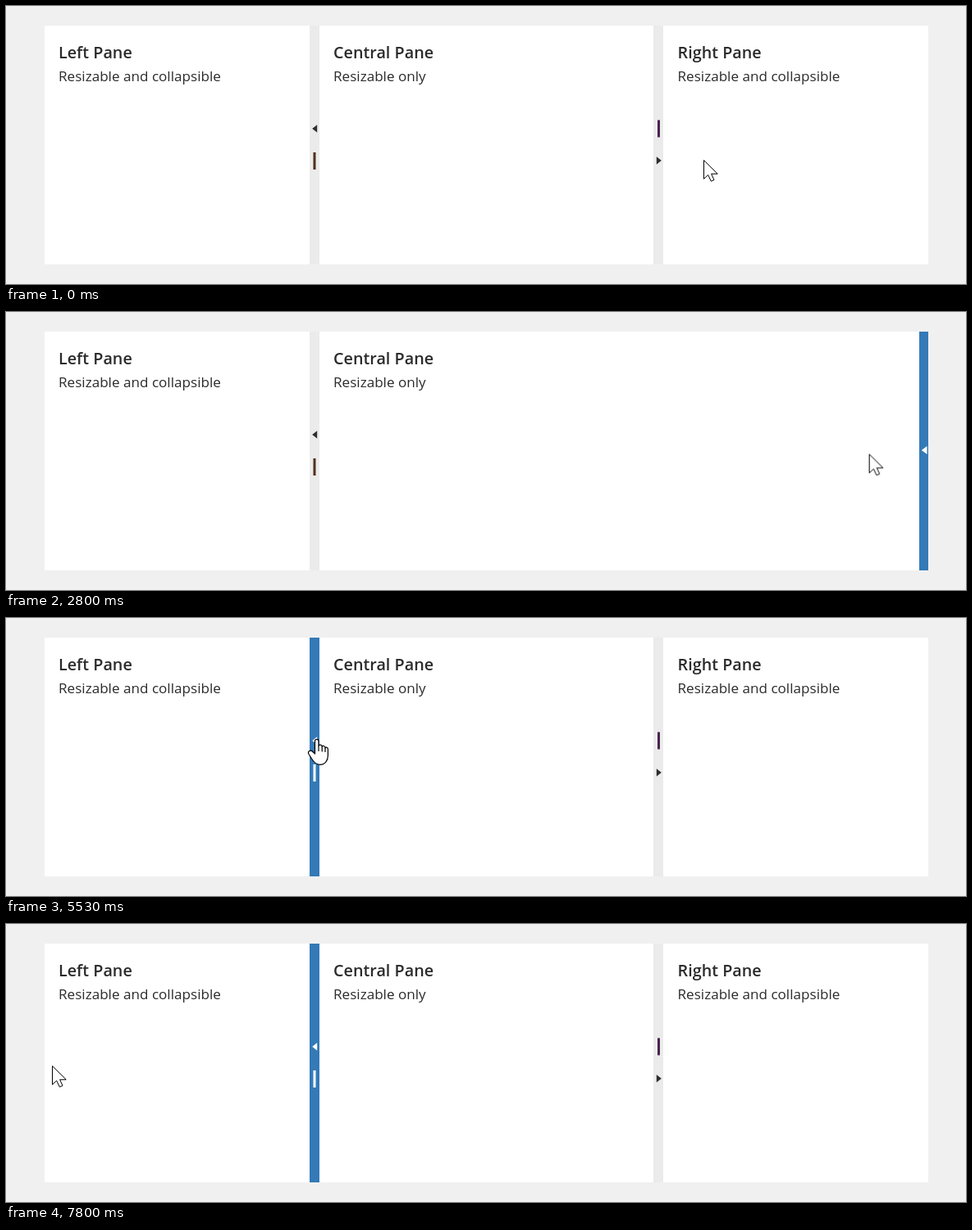
An HTML page that plays this animation: 1170x340 px, repeating every 8 s.

```html
<!DOCTYPE html>
<html lang="en">
<head>
<meta charset="utf-8">
<title>Splitter panes</title>
<style>
html, body { margin: 0; width: 1170px; height: 340px; overflow: hidden; background: #f0f0f0; }
svg { display: block; }
text { font: 17.1px "Open Sans", "Noto Sans", sans-serif; fill: #2b2b2b; }
.title { font-size: 19.8px; font-weight: 600; }

.idle { --track: #ebebeb; --arrow: #2e2e2e; }
.hot { --track: #337ab7; --arrow: #fff; --bar: #fff; }
.track { fill: var(--track); }
.arrow { fill: var(--arrow); }
.bar { fill: var(--bar); }
#left-idle { --bar: #52301c; }
#right-idle { --bar: #4a2450; }

/* All state changes are hard cuts */
[id^="left-"], [id^="right-"], #center, #pointer, #hand, #cursor {
  animation: 8s step-end infinite;
}
#left-idle { animation-name: left-idle; }
#left-hot { animation-name: left-hot; }
#left-shut { animation-name: left-shut; }
#left-text { animation-name: left-text; }
#right-idle { animation-name: right-idle; }
#right-hot { animation-name: right-hot; }
#right-shut { animation-name: right-shut; }
#right-text { animation-name: right-text; }
#center { animation-name: center; }
#pointer { animation-name: pointer; }
#hand { animation-name: hand; }
#cursor { animation-name: travel; }

@keyframes left-idle { 0% { opacity: 1 } 64.1%, 100% { opacity: 0 } }
@keyframes left-hot { 0%, 70.86% { opacity: 0 } 64.1%, 90.86%, 100% { opacity: 1 } }
@keyframes left-shut { 0%, 90.86%, 100% { opacity: 0 } 70.86% { opacity: 1 } }
@keyframes left-text { 0%, 90.86%, 100% { opacity: 1 } 70.86% { opacity: 0 } }
@keyframes center { 0%, 90.86%, 100% { transform: none } 70.86% { transform: translate(-323.5px, 0) } }

@keyframes right-idle { 0%, 69.1%, 100% { opacity: 1 } 17.48% { opacity: 0 } }
@keyframes right-hot { 0%, 24.11%, 69.1%, 100% { opacity: 0 } 17.48%, 46.61% { opacity: 1 } }
@keyframes right-shut { 0%, 46.61%, 100% { opacity: 0 } 24.11% { opacity: 1 } }
@keyframes right-text { 0%, 46.61%, 100% { opacity: 1 } 24.11% { opacity: 0 } }

@keyframes pointer {
  0%, 23.36%, 45.86%, 70.86%, 90.86%, 100% { opacity: 1 }
  17.48%, 38.36%, 64.1%, 85.86% { opacity: 0 }
}
@keyframes hand {
  0%, 23.36%, 45.86%, 70.86%, 100% { opacity: 0 }
  17.48%, 38.36%, 64.1% { opacity: 1 }
}

/* Mouse path, sampled at 15 steps per second */
@keyframes travel {
  0% { transform: translate(850px, 188px) }
  11.62% { transform: translate(850px, 188px); animation-timing-function: steps(2) }
  13.36% { transform: translate(842px, 189px); animation-timing-function: steps(3) }
  15.86% { transform: translate(815px, 191px); animation-timing-function: steps(3) }
  18.36%, 26.62% { transform: translate(799px, 192px) }
  27.48% { transform: translate(804px, 192px); animation-timing-function: steps(3) }
  29.98% { transform: translate(890px, 190px); animation-timing-function: steps(4) }
  33.36% { transform: translate(1030px, 178px); animation-timing-function: steps(3) }
  35.86% { transform: translate(1095px, 164px); animation-timing-function: steps(2) }
  37.48% { transform: translate(1108px, 160px) }
  38.36% { transform: translate(1118px, 165px); animation-timing-function: steps(2) }
  39.98% { transform: translate(1122px, 169px) }
  49.98% { transform: translate(1122px, 169px) }
  50.86% { transform: translate(1108px, 165px); animation-timing-function: steps(3) }
  53.36% { transform: translate(955px, 123px); animation-timing-function: steps(3) }
  55.86% { transform: translate(680px, 86px) }
  56.61% { transform: translate(605px, 84px); animation-timing-function: steps(2) }
  58.36% { transform: translate(493px, 96px); animation-timing-function: steps(3) }
  60.86% { transform: translate(416px, 122px); animation-timing-function: steps(3) }
  63.36% { transform: translate(383px, 141px); animation-timing-function: steps(4) }
  66.61%, 73.37% { transform: translate(378px, 147px); animation-timing-function: steps(3) }
  75.86% { transform: translate(350px, 149px); animation-timing-function: steps(3) }
  78.36% { transform: translate(235px, 156px); animation-timing-function: steps(3) }
  80.86% { transform: translate(120px, 164px); animation-timing-function: steps(4) }
  84.11% { transform: translate(64px, 169px) }
  84.98% { transform: translate(62px, 169px) }
  90.86% { transform: translate(51px, 171px) }
  93.36% { transform: translate(51px, 171px); animation-timing-function: steps(5) }
  97.48%, 100% { transform: translate(56px, 173px) }
}
</style>
</head>
<body>
<svg width="1170" height="340" viewBox="0 0 1170 340">
  <defs>
    <clipPath id="frame"><rect x="47" y="24" width="1077" height="292"/></clipPath>
    <g id="left-grip">
      <rect class="track" x="370" y="24" width="12" height="292"/>
      <path class="arrow" d="M373.2 150l6-4.7v9.4z"/>
      <rect class="bar" x="374.5" y="179" width="3" height="21"/>
    </g>
    <g id="right-grip">
      <rect class="track" x="789" y="24" width="12" height="292"/>
      <path class="arrow" d="M798.8 189l-6-4.7v9.4z"/>
      <rect class="bar" x="794" y="139.5" width="3" height="21"/>
    </g>
  </defs>

  <rect x="47" y="24" width="1077" height="292" fill="#fff"/>

  <g id="left-text">
    <text class="title" x="64" y="64">Left Pane</text>
    <text x="64" y="92">Resizable and collapsible</text>
  </g>
  <g id="center">
    <text class="title" x="399" y="64">Central Pane</text>
    <text x="399" y="92">Resizable only</text>
  </g>
  <g id="right-text">
    <text class="title" x="818.5" y="64">Right Pane</text>
    <text x="818.5" y="92">Resizable and collapsible</text>
  </g>

  <use id="left-idle" class="idle" href="#left-grip"/>
  <use id="left-hot" class="hot" href="#left-grip" opacity="0"/>
  <g id="left-shut" class="hot" opacity="0">
    <rect class="track" x="47" y="24" width="11" height="292"/>
    <path class="arrow" d="M56 169l-6.7-5v10z"/>
  </g>

  <use id="right-idle" class="idle" href="#right-grip"/>
  <use id="right-hot" class="hot" href="#right-grip" opacity="0"/>
  <g id="right-shut" class="hot" opacity="0">
    <rect class="track" x="1113" y="24" width="11" height="292"/>
    <path class="arrow" d="M1115.8 169l6.7-5v10z"/>
  </g>

  <g clip-path="url(#frame)">
    <g id="cursor" fill="#fff" stroke="#000" stroke-linejoin="round">
      <path id="pointer" d="M.5 .7V23.5L5.7 18.6 9.3 26.3 13 24.7 9.6 17.3H17.2Z"/>
      <g id="hand" opacity="0" stroke-width="1.2">
        <path d="M-1.5 19V3.4C-1.5 .6 3 .6 3 3.4V9.5C3.6 7.4 7.2 7.8 7.2 10.4 8 8.8 11 9.2 11 11.8 12 10.6 14.4 11.2 14.4 13.6V21C14.4 27 11 32.3 5 32.3 0 32.3-2.5 29.5-4.5 26.5L-9 19.5C-10.8 16-7 14-4.8 16Z"/>
        <path fill="none" d="M3 9.5V16M7.2 10.4V16.5M11 11.8V17"/>
      </g>
    </g>
  </g>
</svg>
</body>
</html>
```
